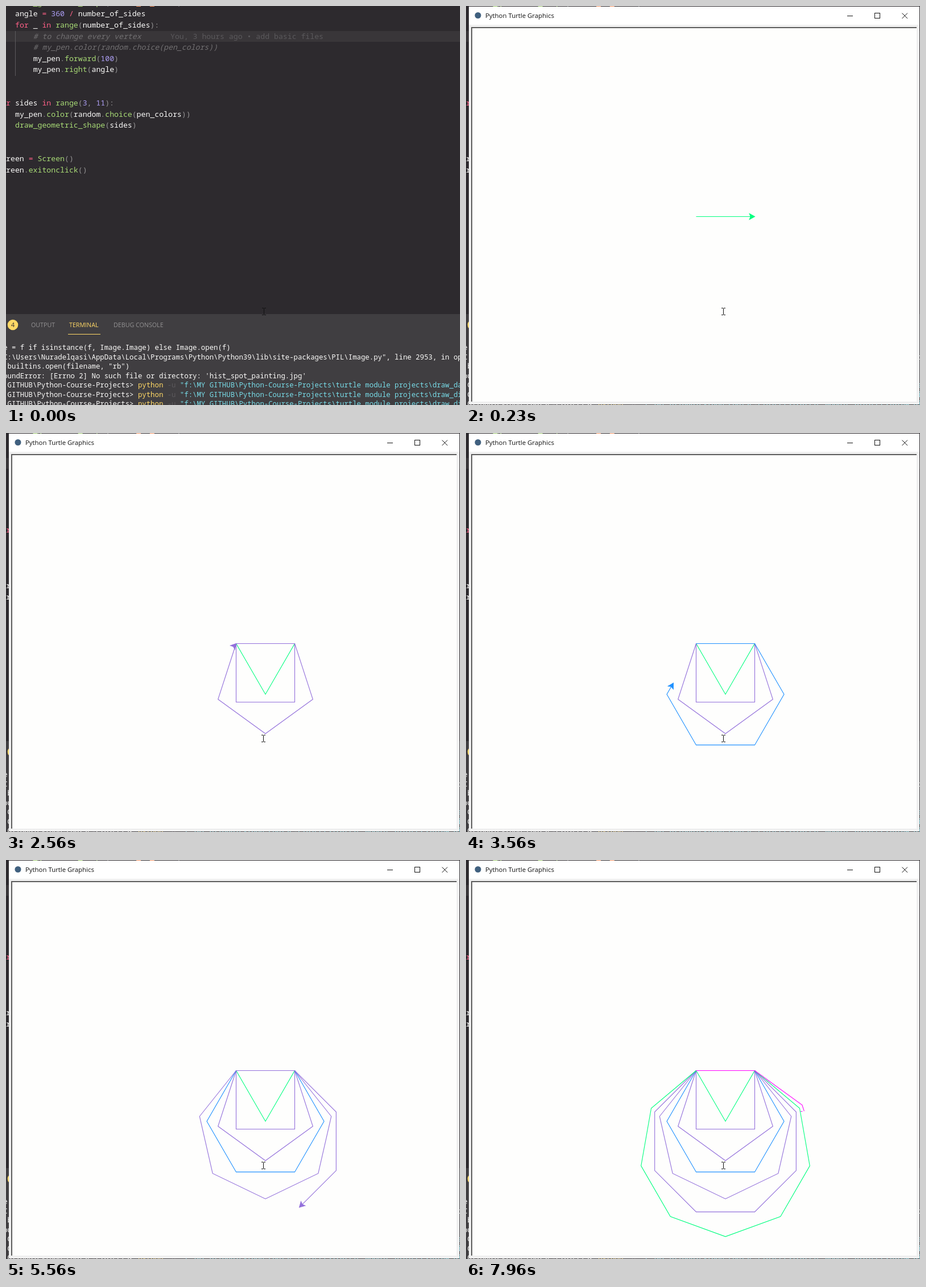
Animation of 798 by 702 pixels, one loop 8000 ms. Source, as an HTML page with a canvas:

```html
<!DOCTYPE html>
<html lang="en">
<head>
<meta charset="utf-8">
<title>Turtle polygons</title>
<style>
html, body { margin: 0; width: 100%; height: 100%; overflow: hidden; background: #2d2a2e; }
canvas { display: block; }
</style>
</head>
<body>
<canvas id="stage" width="798" height="702"></canvas>
<script>
const WIDTH = 798, HEIGHT = 702, LOOP = 8000, UNIT = 1.03, HOPS = 9;
const MONO = '"Noto Sans Mono", monospace', UI = '"Open Sans", sans-serif';
const C = {
  w: '#fcfcfa', k: '#ff6188', n: '#ab9df2', f: '#a9dc76', p: '#939293',
  c: '#727072', o: '#fc9867', b: '#5b595c', y: '#ffd866', s: '#78dce8'
};

const stage = document.getElementById('stage').getContext('2d');
const editorLayer = newLayer(), windowLayer = newLayer();
let ctx = stage; // current drawing surface

// Each run is a colour key, a colon and its text; the first item is the indent.
const code = [
  [0, 'k:def ', 'f:draw_geometric_shape', 'p:(', 'o:number_of_sides', 'p:):'],
  [4, 'w:angle ', 'k:= ', 'n:360 ', 'k:/ ', 'w:number_of_sides'],
  [4, 'k:for ', 'w:_ ', 'k:in ', 'f:range', 'p:(', 'w:number_of_sides', 'p:):'],
  [8, 'c:# to change every vertex'],
  [8, 'c:# my_pen.color(random.choice(pen_colors))'],
  [8, 'w:my_pen', 'p:.', 'f:forward', 'p:(', 'n:100', 'p:)'],
  [8, 'w:my_pen', 'p:.', 'f:right', 'p:(', 'w:angle', 'p:)'],
  [0], [0],
  [0, 'k:for ', 'w:sides ', 'k:in ', 'f:range', 'p:(', 'n:3', 'p:, ', 'n:11', 'p:):'],
  [4, 'w:my_pen', 'p:.', 'f:color', 'p:(', 'w:random', 'p:.', 'f:choice', 'p:(', 'w:pen_colors', 'p:))'],
  [4, 'f:draw_geometric_shape', 'p:(', 'w:sides', 'p:)'],
  [0], [0],
  [0, 'w:screen ', 'k:= ', 'f:Screen', 'p:()'],
  [0, 'w:screen', 'p:.', 'f:exitonclick', 'p:()']
];
const command = end => ['w: GITHUB\\Python-Course-Projects> ', 'y:python ', 'b:-u ',
  's:"f:\\MY GITHUB\\Python-Course-Projects\\turtle module projects\\draw_' + end];
const terminal = [
  ['w:e = f if isinstance(f, Image.Image) else Image.open(f)'],
  ['w:C:\\Users\\Nuradelqasi\\AppData\\Local\\Programs\\Python\\Python39\\lib\\site-packages\\PIL\\Image.py", line 2953, in open'],
  ['w: builtins.open(filename, "rb")'],
  ["w:oundError: [Errno 2] No such file or directory: 'hist_spot_painting.jpg'"],
  command('da'), command('di'), command('di')
];

// Pairs of time (ms) and number of screen updates the turtle has made by then.
const pace = [[0, 0], [100, 0], [130, 3.5], [230, 10.5], [1560, 151.5], [3560, 342.5],
  [5560, 527.5], [6660, 650], [7500, 733], [7960, 767.5], [8000, 768]];
const purple = '#9370db', green = '#00ff7f';
const penColors = [green, purple, purple, '#1e90ff', purple, purple, green, '#ff00ff'];

function newLayer() {
  const canvas = document.createElement('canvas');
  canvas.width = WIDTH;
  canvas.height = HEIGHT;
  return canvas.getContext('2d');
}

function text(str, x, y, color, font) {
  ctx.font = font;
  ctx.fillStyle = color;
  ctx.fillText(str, x, y);
  return x + ctx.measureText(str).width;
}

function runs(list, x, y, size) {
  for (const run of list) {
    const key = run[0];
    const italic = key === 'c' || key === 'o' ? 'italic ' : '';
    x = text(run.slice(2), x, y, C[key], `${italic}${size}px ${MONO}`);
  }
}

function rect(x, y, w, h, color) {
  ctx.fillStyle = color;
  ctx.fillRect(x, y, w, h);
}

function disc(x, y, r, color) {
  ctx.fillStyle = color;
  ctx.beginPath();
  ctx.arc(x, y, r, 0, 2 * Math.PI);
  ctx.fill();
}

function strokes(color, ...lines) {
  ctx.strokeStyle = color;
  ctx.lineWidth = 1;
  ctx.beginPath();
  for (const [x1, y1, x2, y2] of lines) {
    ctx.moveTo(x1, y1);
    ctx.lineTo(x2, y2);
  }
  ctx.stroke();
}

function drawEditor() {
  rect(0, 0, WIDTH, HEIGHT, '#2d2a2e');
  rect(0, 44, WIDTH, 19, '#393639');
  rect(16, 44, 1, 79, C.b);
  code.forEach(([indent, ...list], row) =>
    runs(list, -15.7 + indent * 7.92, 18.3 + (row - 1) * 19.6, 13.2));
  text('You, 3 hours ago • add basic files', 289, 57.5, C.b, `13.2px ${MONO}`);

  rect(0, 542, WIDTH, 160, '#403e41');
  const tabFont = `10.7px ${UI}`;
  disc(12, 561, 9.3, C.y);
  text('4', 9, 565, '#2d2a2e', tabFont);
  text('OUTPUT', 44, 565, C.p, tabFont);
  text('TERMINAL', 111, 565, C.y, tabFont);
  text('DEBUG CONSOLE', 189, 565, C.p, tabFont);
  rect(109, 577, 57, 1, C.y);
  terminal.forEach((list, row) => runs(list, -4.8, 605.3 + row * 16.5, 12.34));
}

function drawArrow(x, y, heading, color) {
  ctx.save();
  ctx.translate(x, y);
  ctx.rotate(heading);
  ctx.scale(UNIT, UNIT);
  ctx.beginPath();
  [[0, 0], [-9, -5], [-7, 0], [-9, 5]].forEach(p => ctx.lineTo(...p));
  ctx.closePath();
  ctx.fillStyle = ctx.strokeStyle = color;
  ctx.lineWidth = 1;
  ctx.fill();
  ctx.stroke();
  ctx.restore();
}

// Every polygon costs one update for its colour, then hops and turn steps per edge.
function drawTurtle(updates, arrowVisible) {
  let left = updates, x = 404.5, y = 370.5, heading = 0, color = green;
  for (let sides = 3; sides <= 10 && left > 0; sides++) {
    const turn = 360 / sides, turnSteps = 1 + Math.floor(turn / 9);
    color = penColors[sides - 3];
    heading = 0;
    left--;
    ctx.beginPath();
    ctx.moveTo(x, y);
    for (let edge = 0; edge < sides && left > 0; edge++) {
      const length = 100 * UNIT * Math.min(left / HOPS, 1);
      x += length * Math.cos(heading);
      y += length * Math.sin(heading);
      ctx.lineTo(x, y);
      left -= HOPS;
      if (left > 0) heading += turn * Math.PI / 180 * Math.min(left / turnSteps, 1);
      left -= turnSteps + 1;
    }
    ctx.strokeStyle = color;
    ctx.lineWidth = 1.1;
    ctx.stroke();
  }
  if (arrowVisible) drawArrow(x, y, heading, color);
  else rect(x - 6, y, 3, 1, color);
}

function updatesAt(t) {
  const i = Math.max(1, pace.findIndex(([time]) => time >= t));
  const [t0, u0] = pace[i - 1], [t1, u1] = pace[i];
  return Math.floor(u0 + (u1 - u0) * (t - t0) / (t1 - t0));
}

function drawWindow(t) {
  rect(5, 1, 792, 700, '#f0f0f0');
  rect(5, 1, 792, 32, '#ffffff');
  rect(9, 37, 783, 659, '#fefefd');
  rect(9, 37, 783, 2, '#5c5c5c');
  rect(9, 37, 2, 659, '#5c5c5c');
  disc(21, 16.5, 5.5, '#40607f');
  text('Python Turtle Graphics', 34, 21, '#111', `11.4px ${UI}`);
  strokes('#111', [670, 17.5, 680, 17.5],
    [766.5, 12.5, 776, 22], [776, 12.5, 766.5, 22]);
  ctx.strokeRect(718.5, 12.5, 9, 9);
  drawTurtle(updatesAt(t), t < 7950);
}

function drawCursor(t) {
  const x = t < 100 ? 453 : 452;
  strokes('#111', [x + .5, 532, x + .5, 543],
    [x - 3, 531.5, x, 531.5], [x + 1, 531.5, x + 4, 531.5],
    [x - 3, 543.5, x, 543.5], [x + 1, 543.5, x + 4, 543.5]);
}

function drawOn(surface, draw, t) {
  ctx = surface;
  draw(t);
  ctx = stage;
}

function drawFrame(t) {
  stage.drawImage(editorLayer.canvas, 0, 0);
  const shown = Math.min(Math.max((t - 35) / 130, 0), 1);
  if (shown > 0) {
    drawOn(windowLayer, drawWindow, t);
    const scale = 1 - 0.052 * (1 - shown);
    stage.save();
    stage.globalAlpha = shown;
    stage.translate(5 * (1 - scale), 1 - scale);
    stage.scale(scale, scale);
    stage.drawImage(windowLayer.canvas, 0, 0);
    stage.restore();
  }
  drawCursor(t);
}

drawOn(editorLayer, drawEditor);
const start = performance.now();
function tick() {
  drawFrame((performance.now() - start) % LOOP);
  requestAnimationFrame(tick);
}
tick();
</script>
</body>
</html>
```
